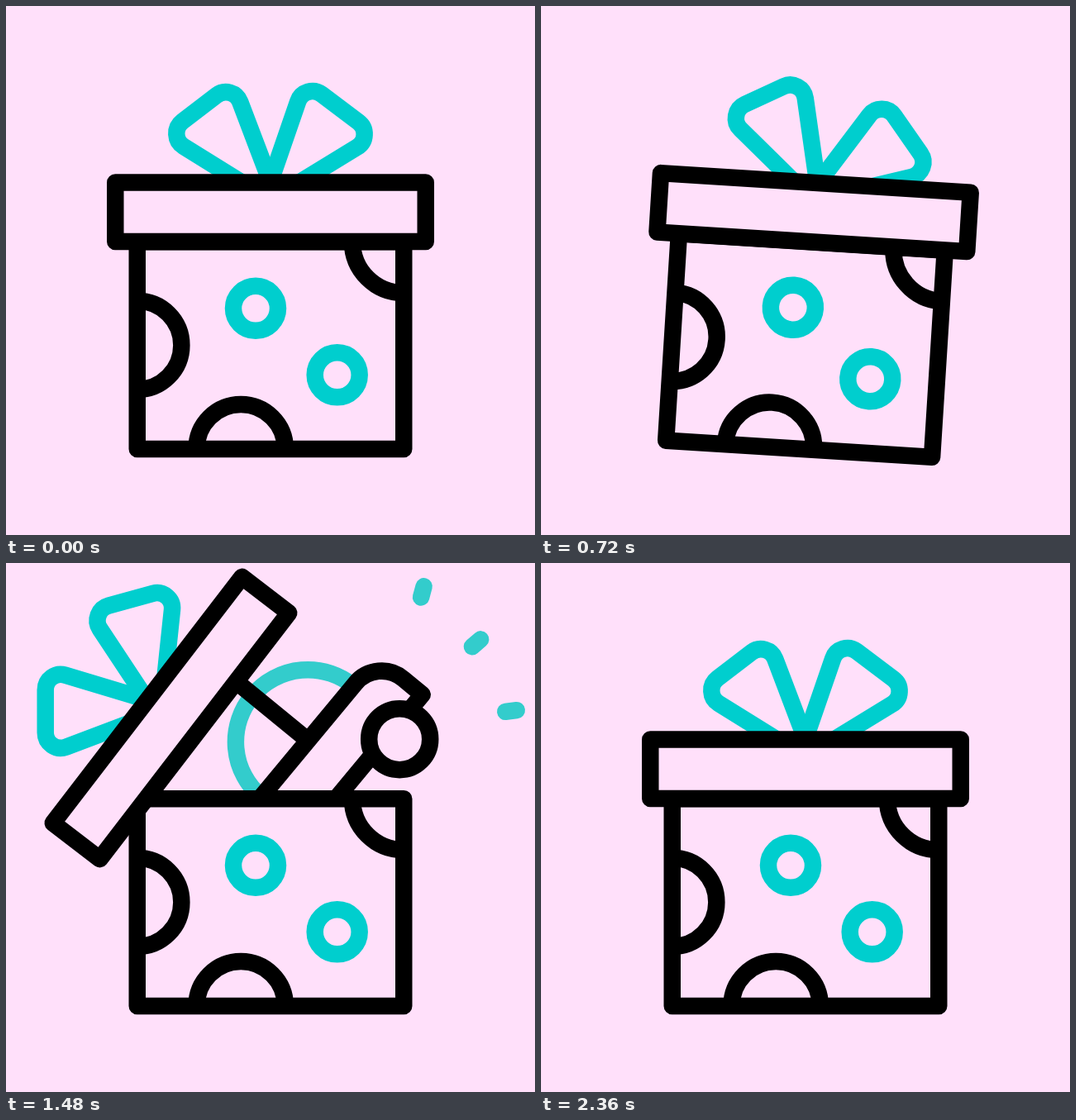
An HTML page with a canvas that plays this animation: 640 px wide and 640 px high, repeating every 2400 ms.

```html
<!DOCTYPE html>
<html lang="en">
<head>
<meta charset="utf-8">
<title>Gift box</title>
<style>
  html, body { margin: 0; width: 100%; height: 100%; overflow: hidden; background: #ffe0fa; }
  canvas { display: block; }
</style>
</head>
<body>
<canvas id="stage" width="640" height="640"></canvas>
<script>
const ctx = document.getElementById('stage').getContext('2d');
const LOOP = 2400, PINK = '#ffe0fa', BLACK = '#000', TEAL = '#00cece', SOFT_TEAL = '#33cccc';
const RAD = Math.PI / 180;

const clamp = v => Math.min(1, Math.max(0, v));
const ease = (t, from, to) => {
  const u = clamp((t - from) / (to - from));
  return u * u * (3 - 2 * u);
};

// Eased swing from rest through evenly timed peaks and back to rest
function swing(t, step, ...peaks) {
  let angle = 0, previous = 0;
  [...peaks, 0].forEach((peak, i) => {
    angle += (peak - previous) * ease(t, i * step, (i + 1) * step);
    previous = peak;
  });
  return angle;
}

function layer(draw) {
  ctx.save();
  draw();
  ctx.restore();
}

function spin(x, y, degrees) {
  ctx.translate(x, y);
  ctx.rotate(degrees * RAD);
  ctx.translate(-x, -y);
}

function clipTo(x, y, w, h) {
  ctx.beginPath();
  ctx.rect(x, y, w, h);
  ctx.clip();
}

function paint(color, fill, trace) {
  ctx.beginPath();
  trace();
  if (fill) { ctx.fillStyle = fill; ctx.fill(); }
  ctx.strokeStyle = color;
  ctx.stroke();
}

const arc = (x, y, r, color, fill, from = 0, to = 360) =>
  paint(color, fill, () => ctx.arc(x, y, r, from * RAD, to * RAD));
const box = (x, y, w, h) => paint(BLACK, PINK, () => ctx.rect(x, y, w, h));
const line = (x1, y1, x2, y2, color) => paint(color, null, () => {
  ctx.moveTo(x1, y1);
  ctx.lineTo(x2, y2);
});

function bowLoop(apex, top, side, angle) {
  layer(() => {
    spin(318, 226, angle);
    paint(TEAL, null, () => {
      ctx.moveTo(...apex);
      ctx.arcTo(...top, ...side, 18.5);
      ctx.arcTo(...side, ...apex, 18.5);
      ctx.closePath();
    });
  });
}

function drawBow(t) {
  bowLoop([331, 242], [274.4, 92.9], [192.3, 155.9], swing(t, 375, -27, 9.7, -7.5));
  bowLoop([310, 241], [361.5, 91.5], [448, 156.6], swing(t, 375, -27, 15.2, -8.5));
}

function moveLid(t) {
  const open = ease(t, 830, 1090) - ease(t, 1925, 2355);
  const sag = 0.033 * (ease(t, 1620, 1780) - ease(t, 1850, 2150));
  ctx.translate(-120.5 * (open - sag), -61.75 * (open - sag));
  spin(320, 249.25, -52.46 * open);
}

// The toy pops up, sinks slowly, then drops under the closing lid
function toyOffset(t) {
  const rise = (1 - clamp((t - 1000) / 580)) ** 3;
  const sink = (Math.max(0, t - 1580) / 520) ** 1.31;
  const drop = clamp((t - 2100) / 220) ** 1.6;
  return [9 - 159 * rise - 30 * sink - 60 * drop, -10 + 150 * rise + 35 * sink + 100 * drop];
}

function drawToy(t) {
  if (t < 1000 || t > 2330) return;
  clipTo(0, 0, 640, 286);
  ctx.translate(...toyOffset(t));
  arc(357, 225.7, 87.3, SOFT_TEAL, null, 130, 310);
  line(270, 152.5, 350, 218, BLACK);
  paint(BLACK, PINK, () => {
    ctx.moveTo(187, 429);
    ctx.arcTo(440.8, 123.2, 495.5, 168.5, 41);
    ctx.lineTo(495.5, 168.5);
    ctx.lineTo(241, 475);
  });
  arc(468, 222.4, 37, BLACK, PINK);
}

function drawBody() {
  box(158.75, 285.25, 322.5, 250.75);
  layer(() => {
    clipTo(150, 277, 340, 268);
    arc(158.75, 410.4, 53.6, BLACK);
    arc(284.2, 535.6, 53.6, BLACK);
    arc(481, 285.25, 62, BLACK);
  });
  arc(302, 365.8, 27, TEAL);
  arc(400.7, 446.3, 27, TEAL);
}

function drawSparks(t) {
  if (t <= 1150 || t >= 1560) return;
  const head = 97 * ease(t, 1150, 1430), tail = 97 * ease(t, 1225, 1560);
  for (let i = -1; i <= 1; i++) layer(() => {
    ctx.translate(501 + 20.5 * i, 156 + 34 * i);
    ctx.rotate((34 * i - 41) * RAD);
    line(tail, 0, head, 0, SOFT_TEAL);
  });
}

function draw(t) {
  ctx.fillStyle = PINK;
  ctx.fillRect(0, 0, 640, 640);
  ctx.lineWidth = 20.5;
  ctx.lineJoin = ctx.lineCap = 'round';
  layer(() => {
    spin(320, 410.5, swing(t, 275, -17.2, 11.2));
    layer(() => { moveLid(t); drawBow(t); });
    layer(() => drawToy(t));
    drawBody();
    layer(() => { moveLid(t); box(132.25, 213.5, 375.5, 71.5); });
  });
  drawSparks(t);
}

function tick() {
  draw(performance.now() % LOOP);
  requestAnimationFrame(tick);
}
tick();
</script>
</body>
</html>
```
